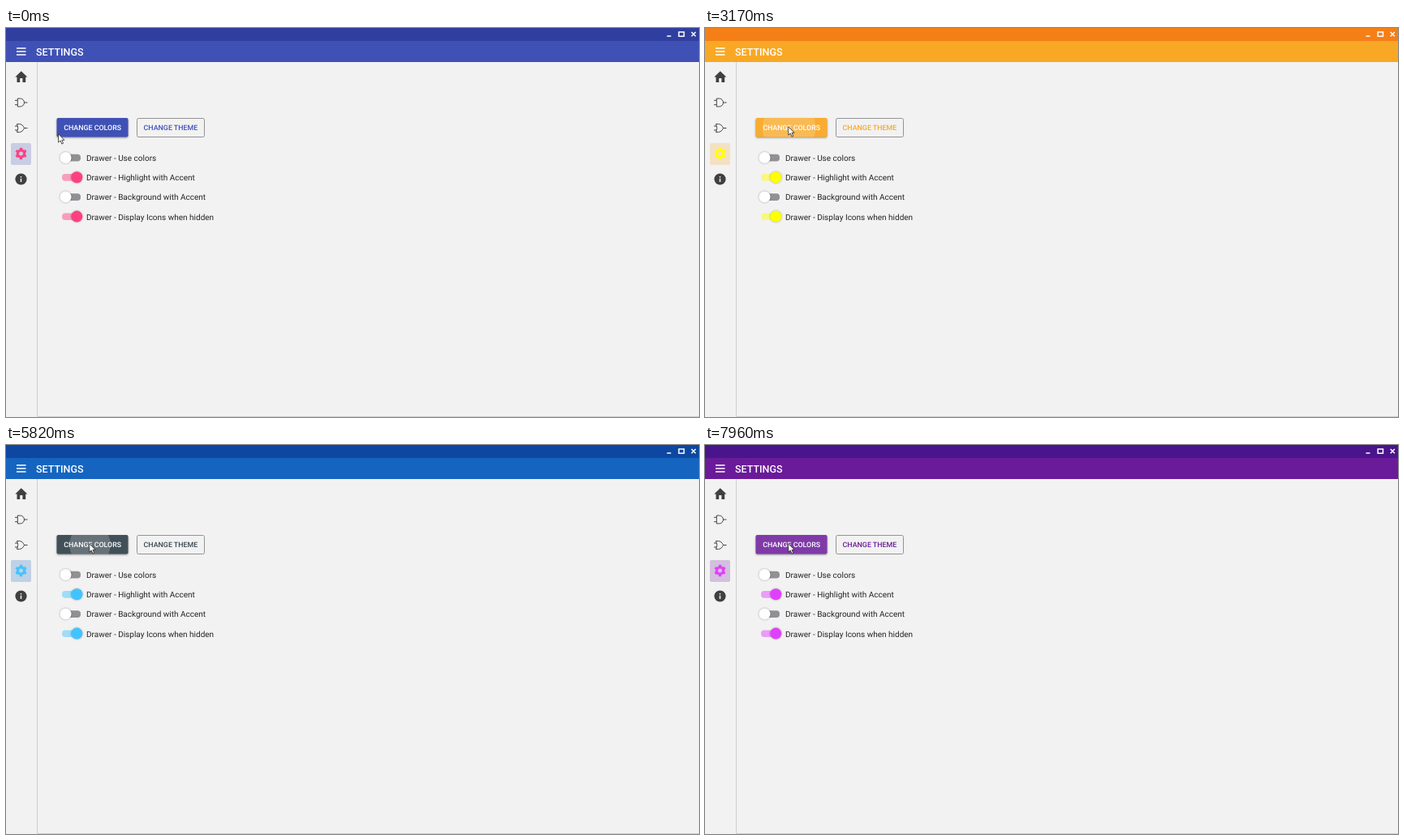
Recreate the animation shown at these times as an HTML page. Size 854 by 480 pixels, loop 8 s.

```html
<!DOCTYPE html>
<html lang="en">
<head>
<meta charset="utf-8">
<title>Settings</title>
<style>
  html, body { margin: 0; width: 100%; height: 100%; overflow: hidden; background: #f2f2f2; }
  svg { display: block; width: 100vw; height: 100vh; }
  text { font-family: Roboto, sans-serif; text-rendering: geometricPrecision; }
  .dark { fill: var(--dark); }
  .main { fill: var(--main); }
  .accent { fill: var(--accent); }
  .btn { fill: var(--button); }
  .title { font-size: 12.5px; font-weight: 500; fill: #fff; }
  .caption { font-size: 8.85px; font-weight: 500; text-anchor: middle; }
  .label { font-size: 10px; fill: #242424; }
  .line { fill: none; stroke: #fff; stroke-width: 1.5; }
  .icon { fill: #404040; }
  .gate { fill: none; stroke: #454545; stroke-width: 1; }
  .gear { fill: none; stroke: var(--accent); }
  .lift { filter: drop-shadow(0 1px 1px rgba(0, 0, 0, .4)); }
  .knob { filter: drop-shadow(0 .7px .8px rgba(0, 0, 0, .35)); }
</style>
</head>
<body>
<svg viewBox="0 0 854 480" preserveAspectRatio="none">
  <defs>
    <clipPath id="face"><rect x="62.5" y="111" width="88" height="23.5" rx="2"/></clipPath>
  </defs>
  <rect width="854" height="480" fill="#f2f2f2"/>
  <path d="M38.5 42V479.5H854" fill="none" stroke="#cfcfcf"/>

  <rect class="main" y="15" width="854" height="27"/>
  <rect class="dark" width="854" height="16"/>
  <path class="line" d="M814.5 10h5M829.2 5h6.3v5.3h-6.3zM844.7 5l5.2 5.3M849.9 5l-5.2 5.3"/>
  <path class="line" d="M13 25h11.5M13 29h11.5M13 33h11.5"/>
  <text class="title" x="37" y="33.6">SETTINGS</text>

  <path class="icon" d="M17.2 67v-5h3.2v5h3.8v-6.6h2.2L18.8 53.2 11.3 60.4h2.2V67z"/>
  <path class="gate" d="M14.3 87h3.2a5 5 0 0 1 0 10h-3.2zM11 89.3h3.3M11 94.7h3.3M22.5 92h4"/>
  <path class="gate" d="M13.5 118.5h3q4.2.3 6 5-1.8 4.700-6 5h-3q2.600-5 0-10zM11 121h3.500M11 126h3.500M22.500 123.500h4"/>
  <rect class="main" x="6" y="142" width="25" height="27" rx="2" opacity=".23"/>
  <g class="gear" transform="translate(18.500 155) rotate(30)">
    <circle r="4.100" stroke-width="3.200"/>
    <circle r="6.200" stroke-width="2" pathLength="12" stroke-dasharray="1 1" stroke-dashoffset=".5"/>
  </g>
  <circle class="icon" cx="18.500" cy="186.500" r="7.100"/>
  <path d="M18.500 185.800v4.200M18.500 183v1.500" stroke="#f2f2f2" stroke-width="1.500"/>

  <rect class="btn lift" x="62.5" y="111" width="88" height="23.5" rx="2"/>
  <g clip-path="url(#face)" fill="#fff">
    <rect id="hover" x="62" y="110" width="90" height="26"/>
    <circle id="ripple" cx="103.5" cy="123"/>
  </g>
  <text class="caption" x="106.6" y="126.1" fill="#fff">CHANGE COLORS</text>
  <rect x="161.5" y="111.5" width="83" height="23" rx="2" fill="none" stroke="#939393"/>
  <text class="caption btn" x="202.900" y="126.100">CHANGE THEME</text>

  <g id="switches"></g>

  <path id="cursor" d="M0 0V10.300L2.400 8.200 4.200 12.300 5.900 11.500 4.200 7.500H7.300z"
        fill="#fff" stroke="#222" stroke-width=".8" stroke-linejoin="round"/>
</svg>
<script>
const LOOP = 8000, RIPPLE = 480, BUTTON_LAG = 40;
const $ = id => document.getElementById(id);

// press time, repaint time, bar shades and accent
const schemes = [
  [-LOOP, -LOOP, '#303f9f', '#3f51b5', '#ff4081'],
  [960, 1040, '#b71c1c', '#c62828', '#ff5252'],
  [1650, 1730, '#e65100', '#ef6c00', '#ffab40'],
  [2400, 2480, '#ff6f00', '#ff8f00', '#ffd740'],
  [3070, 3130, '#f57f17', '#f9a825', '#ffff00'],
  [3770, 3850, '#689f38', '#7cb342', '#ccff90'],
  [4405, 4515, '#388e3c', '#43a047', '#b9f6ca'],
  [4900, 4980, '#263238', '#37474f', '#40c4ff'],
  [5745, 5820, '#0d47a1', '#1565c0', '#40c4ff'],
  [6480, 6560, '#01579b', '#0277bd', '#40c4ff'],
  [7110, 7190, '#311b92', '#4527a0', '#7c4dff'],
  [7755, 7835, '#4a148c', '#6a1b9a', '#e040fb']
];

const options = [
  ['Use colors', false],
  ['Highlight with Accent', true],
  ['Background with Accent', false],
  ['Display Icons when hidden', true]
];

$('switches').innerHTML = options.map(([name, on], i) => {
  const y = 160 + i * 24.2;
  const tint = on ? 'class="accent" opacity=".47"' : 'fill="#929094"';
  return `<rect x="69" y="${y - 4.2}" width="23" height="8.7" rx="4" ${tint}/>
    <circle class="knob${on ? ' accent' : ''}" cx="${on ? 87.3 : 73.5}" cy="${y}" r="7" fill="#fff"/>
    <text class="label" x="99" y="${y + 3.9}">Drawer - ${name}</text>`;
}).join('');

const clamp = x => Math.min(1, Math.max(0, x));
const latest = (t, column) => schemes.filter(s => s[column] <= t).pop();

function draw(t) {
  const [, , dark, main, accent] = latest(t, 1);
  const style = document.documentElement.style;
  style.setProperty('--dark', dark);
  style.setProperty('--main', main);
  style.setProperty('--accent', accent);
  style.setProperty('--button', latest(t - BUTTON_LAG, 1)[3]);

  const p = clamp((t - latest(t, 0)[0]) / RIPPLE);
  const eased = p * (2 - p);
  $('ripple').setAttribute('r', 88 * eased);
  $('ripple').setAttribute('opacity', .27 * (1 - eased));
  $('hover').setAttribute('opacity', .05 * clamp((t - 50) / 110));

  const move = clamp((t - 320) / 110);
  $('cursor').setAttribute('transform', `translate(${64.6 + 38.2 * move} ${130.8 - 9 * move})`);
}

let start;
function tick(now) {
  start ??= now;
  draw((now - start) % LOOP);
  requestAnimationFrame(tick);
}
draw(0);
requestAnimationFrame(tick);
</script>
</body>
</html>
```
